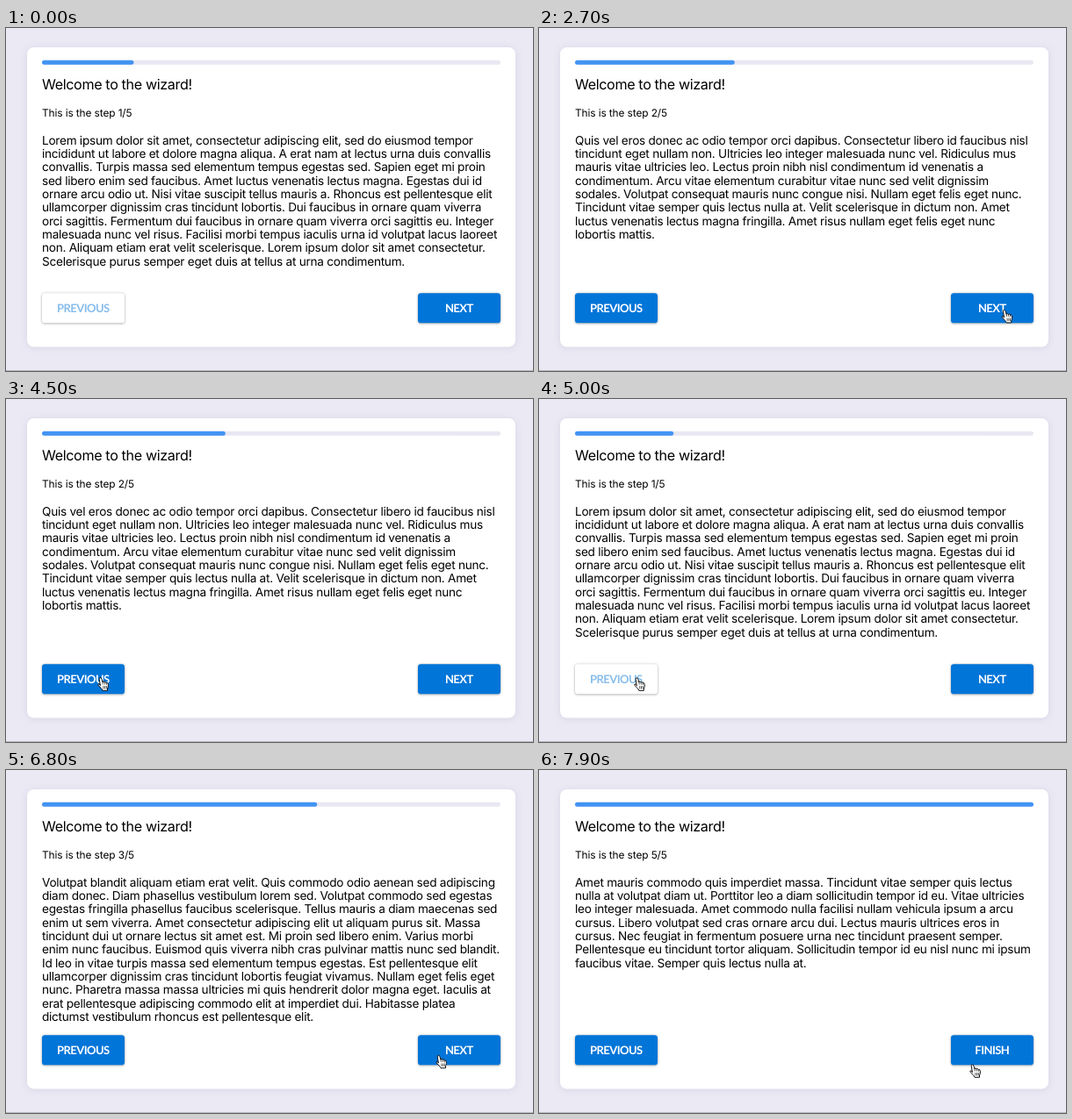
An HTML page that plays this animation: 600x391 px, repeating every 8 s.

```html
<!DOCTYPE html>
<html lang="en">
<head>
<meta charset="utf-8">
<title>Wizard</title>
<style>
  html, body { margin: 0; width: 100%; height: 100%; overflow: hidden; background: #ebe9f4; }
  svg { display: block; width: 100vw; height: 100vh; font-family: Inter, Roboto, sans-serif; }
  text { fill: #000; white-space: pre; text-rendering: geometricPrecision; }
  .card { fill: #fff; filter: drop-shadow(0 1px 4px rgba(60, 50, 100, .1)); }
  .title { font-size: 16.1px; letter-spacing: -.35px; }
  .step { font-size: 11.9px; letter-spacing: -.11px; }
  .body { font-size: 13.6px; letter-spacing: -.255px; }
  .button rect {
    fill: #0275d8;
    filter: drop-shadow(0 1px .8px rgba(0, 0, 0, .2)) drop-shadow(0 .6px 1.4px rgba(0, 0, 0, .2));
  }
  .button text { fill: #fff; font: 700 13px Lato, sans-serif; letter-spacing: -.55px; text-anchor: middle; }
  .button.off rect { fill: #fff; }
  .button.off text { fill: #88bdeb; }
</style>
</head>
<body>
<svg viewBox="0 0 600 391">
  <rect width="600" height="391" fill="#ebe9f4"/>
  <rect y="390" width="600" height="1" fill="#b9b8c0"/>
  <rect class="card" x="24" y="22" width="556" height="341.5" rx="8"/>
  <rect x="41" y="36.7" width="522" height="5.1" rx="2.5" fill="#e9e8f2"/>
  <rect id="bar" x="41" y="36.7" height="5.1" rx="2.5" fill="#4293f3"/>
  <text class="title" x="41" y="70">Welcome to the wizard!</text>
  <text class="step" id="step" x="41" y="101"></text>
  <g class="body" id="body"></g>
  <g class="button" id="prev">
    <rect x="41" y="302.2" width="94" height="34.1" rx="3.4"/>
    <text x="87.8" y="323.8">PREVIOUS</text>
  </g>
  <g class="button">
    <rect x="469" y="302.2" width="94" height="34.1" rx="3.4"/>
    <text id="next" x="515.8" y="323.8"></text>
  </g>
  <g id="hand" stroke="#111" stroke-linejoin="round" stroke-linecap="round">
    <path fill="#fff" d="M3.3 9.2L2.3 2.6Q2 .8 3.2.7Q4.4.6 4.9 2.2L6 5.8Q6 4.8 7 4.9Q8 5 8.2 6Q8.6 5.2 9.5 5.6Q10.2 5.9 10.3 6.7Q11 6 11.8 6.7Q12.6 8 12.4 10Q12.2 12 11.5 13V15.3H6Q5.6 14 4.2 12.6L1.4 9.6Q.4 8.4 1.2 7.9Q2 7.5 3.3 9.2Z"/>
    <path fill="none" stroke-width=".7" d="M6 5.8L6.4 8M8.2 6L8.5 8.1M10.3 6.7L10.5 8.4M6.9 10.4V13M8.7 10.4V13M10.4 10.4V13"/>
  </g>
</svg>
<script>
const LOOP = 8000, FRAME = 100, SLIDE = 300;

const pages = [
`Lorem ipsum dolor sit amet, consectetur adipiscing elit, sed do eiusmod tempor
incididunt ut labore et dolore magna aliqua. A erat nam at lectus urna duis convallis
convallis. Turpis massa sed elementum tempus egestas sed. Sapien eget mi proin
sed libero enim sed faucibus. Amet luctus venenatis lectus magna. Egestas dui id
ornare arcu odio ut. Nisi vitae suscipit tellus mauris a. Rhoncus est pellentesque elit
ullamcorper dignissim cras tincidunt lobortis. Dui faucibus in ornare quam viverra
orci sagittis. Fermentum dui faucibus in ornare quam viverra orci sagittis eu. Integer
malesuada nunc vel risus. Facilisi morbi tempus iaculis urna id volutpat lacus laoreet
non. Aliquam etiam erat velit scelerisque. Lorem ipsum dolor sit amet consectetur.
Scelerisque purus semper eget duis at tellus at urna condimentum.`,
`Quis vel eros donec ac odio tempor orci dapibus. Consectetur libero id faucibus nisl
tincidunt eget nullam non. Ultricies leo integer malesuada nunc vel. Ridiculus mus
mauris vitae ultricies leo. Lectus proin nibh nisl condimentum id venenatis a
condimentum. Arcu vitae elementum curabitur vitae nunc sed velit dignissim
sodales. Volutpat consequat mauris nunc congue nisi. Nullam eget felis eget nunc.
Tincidunt vitae semper quis lectus nulla at. Velit scelerisque in dictum non. Amet
luctus venenatis lectus magna fringilla. Amet risus nullam eget felis eget nunc
lobortis mattis.`,
`Volutpat blandit aliquam etiam erat velit. Quis commodo odio aenean sed adipiscing
diam donec. Diam phasellus vestibulum lorem sed. Volutpat commodo sed egestas
egestas fringilla phasellus faucibus scelerisque. Tellus mauris a diam maecenas sed
enim ut sem viverra. Amet consectetur adipiscing elit ut aliquam purus sit. Massa
tincidunt dui ut ornare lectus sit amet est. Mi proin sed libero enim. Varius morbi
enim nunc faucibus. Euismod quis viverra nibh cras pulvinar mattis nunc sed blandit.
Id leo in vitae turpis massa sed elementum tempus egestas. Est pellentesque elit
ullamcorper dignissim cras tincidunt lobortis feugiat vivamus. Nullam eget felis eget
nunc. Pharetra massa massa ultricies mi quis hendrerit dolor magna eget. Iaculis at
erat pellentesque adipiscing commodo elit at imperdiet dui. Habitasse platea
dictumst vestibulum rhoncus est pellentesque elit.`,
`Egestas purus viverra accumsan in nisl nisi scelerisque eu. Sed viverra tellus in hac
habitasse platea. Amet nulla facilisi morbi tempus iaculis urna id. Mattis nunc sed
blandit libero volutpat. Vitae congue mauris rhoncus aenean vel elit scelerisque.
Turpis egestas integer eget aliquet nibh praesent. Feugiat nisl pretium fusce id velit
ut tortor. Lacus sed turpis tincidunt id aliquet risus. Ornare arcu dui vivamus arcu
felis bibendum ut. Nunc mattis enim ut tellus elementum sagittis vitae et leo. Quam
lacus suspendisse faucibus interdum posuere lorem ipsum dolor.`,
`Amet mauris commodo quis imperdiet massa. Tincidunt vitae semper quis lectus
nulla at volutpat diam ut. Porttitor leo a diam sollicitudin tempor id eu. Vitae ultricies
leo integer malesuada. Amet commodo nulla facilisi nullam vehicula ipsum a arcu
cursus. Libero volutpat sed cras ornare arcu dui. Lectus mauris ultrices eros in
cursus. Nec feugiat in fermentum posuere urna nec tincidunt praesent semper.
Pellentesque eu tincidunt tortor aliquam. Sollicitudin tempor id eu nisl nunc mi ipsum
faucibus vitae. Semper quis lectus nulla at.`
];

// [time, step shown from then on]
const clicks = [[0, 1], [2500, 2], [3108, 3], [4110, 2], [4750, 1],
                [6110, 2], [6400, 3], [6950, 4], [7350, 5]];

// [time, x, y] of the pointer
const moves = [[1000, 565, 391], [1700, 535, 325], [2500, 535, 325], [3100, 501, 308],
               [3400, 501, 308], [4050, 104, 317], [4950, 104, 317], [5800, 489, 324.5],
               [7350, 489, 324.5], [7850, 490, 335]];

const $ = id => document.getElementById(id);
const clamp = v => Math.max(0, Math.min(1, v));
const ease = v => v * v * (3 - 2 * v);
const mix = (a, b, k) => a + (b - a) * k;

let shown = 0;

function showStep(n) {
  if (n === shown) return;
  shown = n;
  $("step").textContent = `This is the step ${n}/5`;
  $("body").innerHTML = pages[n - 1].split("\n")
    .map((line, i) => `<text x="41" y="${132.5 + i * 15.35}">${line}</text>`).join("");
  $("prev").classList.toggle("off", n === 1);
  $("next").textContent = n === 5 ? "FINISH" : "NEXT";
}

function pointer(t) {
  const i = moves.findIndex(m => m[0] > t);
  if (i < 0) return moves[moves.length - 1].slice(1);
  const [t0, x0, y0] = moves[i - 1], [t1, x1, y1] = moves[i];
  const k = ease((t - t0) / (t1 - t0));
  return [mix(x0, x1, k), mix(y0, y1, k)];
}

function draw(t) {
  let i = clicks.length - 1;
  while (clicks[i][0] > t) i--;
  const [start, step] = clicks[i];
  const before = i ? clicks[i - 1][1] : step;
  showStep(step);
  $("bar").setAttribute("width", mix(before, step, ease(clamp((t - start) / SLIDE))) * 104.4);

  const visible = t >= moves[0][0];
  $("hand").style.display = visible ? "" : "none";
  if (visible) $("hand").setAttribute("transform", `translate(${pointer(t)})`);
}

const began = performance.now();
function tick() {
  const t = (performance.now() - began) % LOOP;
  draw(Math.floor(t / FRAME) * FRAME);
  requestAnimationFrame(tick);
}
tick();
</script>
</body>
</html>
```
